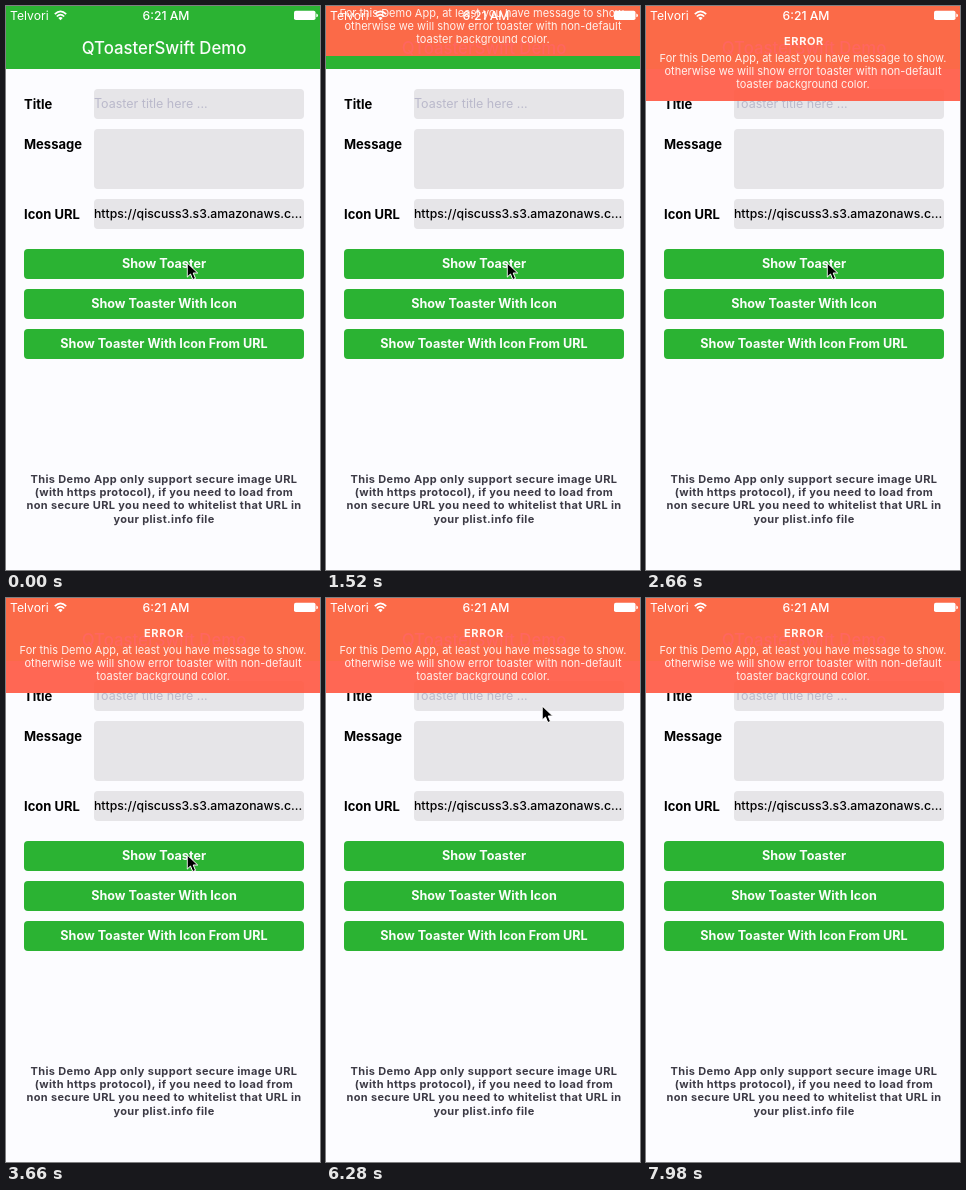
An HTML page for the animation above (8 s loop, 314 px wide and 564 px high).

```html
<!DOCTYPE html>
<html lang="en">
<head>
<meta charset="utf-8">
<title>Toaster demo</title>
<style>
  html, body { margin: 0; width: 100%; height: 100%; overflow: hidden; background: #fcfcff; }
  #stage { position: relative; width: 314px; height: 564px; overflow: hidden; background: #fcfcff;
    font: 12.5px Inter, "Open Sans", sans-serif; white-space: nowrap; }
  #stage div, #stage svg { position: absolute; }
  .header { left: 0; top: 0; width: 314px; height: 63px; background: #2bb333; }
  .heading { left: 1px; top: 29.5px; width: 314px; text-align: center;
    font-size: 16.8px; font-weight: 500; line-height: 24px; color: #fafdfa; }
  .label { left: 18px; font-size: 13px; font-weight: 700; line-height: 30px; color: #000; }
  .field { left: 88px; width: 210px; height: 30px; line-height: 30px; border-radius: 4px; background: #e6e5e8; }
  .placeholder { color: #bab9cb; }
  .url { font-size: 12.25px; font-weight: 500; color: #000; }
  .button { left: 18px; width: 280px; height: 30px; line-height: 30px; border-radius: 4px;
    background: #2bb333; color: #fafdfa; font-size: 12.6px; font-weight: 700; text-align: center; }
  .note { left: 1px; top: 467px; width: 314px; text-align: center; color: #3d3b46;
    font-size: 11px; font-weight: 700; line-height: 13.2px; letter-spacing: .35px; }
  #veil { left: 0; top: 0; width: 314px; height: 0; overflow: hidden;
    background: linear-gradient(#fb6a48 63px, #ff6754 63px); }
  #veil .heading { color: #ff6660; }
  #veil .field { top: 83px; background: #fe6550; }
  #toast { left: 0; top: 0; width: 314px; height: 95px; text-align: center; color: #fff1ec;
    font-size: 11px; line-height: 13px; transform: translateY(-95px); }
  .error { left: 1px; top: 29px; width: 314px; font-weight: 700; letter-spacing: .6px; color: #fff8f5; }
  .message { left: 0; top: 45.5px; width: 314px; }
  .status { top: 2px; font-size: 12.2px; line-height: 15px; color: #fff; }
</style>
</head>
<body>
<div id="stage">
  <div class="header"></div>
  <div class="heading">QToasterSwift Demo</div>

  <div class="label" style="top:83px">Title</div>
  <div class="label" style="top:123px">Message</div>
  <div class="label" style="top:193px">Icon URL</div>
  <div class="field placeholder" style="top:83px">Toaster title here ...</div>
  <div class="field" style="top:123px;height:60px"></div>
  <div class="field url" style="top:193px">https://qiscuss3.s3.amazonaws.c...</div>

  <div class="button" style="top:243px">Show Toaster</div>
  <div class="button" style="top:283px">Show Toaster With Icon</div>
  <div class="button" style="top:323px">Show Toaster With Icon From URL</div>

  <div class="note">This Demo App only support secure image URL<br>(with https protocol), if you need to load from<br>non secure URL you need to whitelist that URL in<br>your plist.info file</div>

  <div id="veil">
    <div class="heading">QToasterSwift Demo</div>
    <div class="field"></div>
  </div>
  <div id="toast">
    <div class="error">ERROR</div>
    <div class="message">For this Demo App, at least you have message to show.<br>otherwise we will show error toaster with non-default<br>toaster background color.</div>
  </div>

  <div class="status" style="left:4px">Telvori</div>
  <div class="status" style="left:3px;width:314px;text-align:center;font-weight:500">6:21 AM</div>
  <svg style="left:48px;top:4px" width="13" height="11" fill="none" stroke="#fff" stroke-width="1.7">
    <path d="M.8 4.2Q6.5-1.4 12.2 4.2M2.8 6.5Q6.5 2.9 10.2 6.5"/>
    <path d="M4.3 7.9Q6.5 6 8.7 7.9L6.5 10.3Z" fill="#fff" stroke="none"/>
  </svg>
  <svg style="left:287px;top:4px" width="27" height="11" fill="#fff">
    <rect x="1" y=".7" width="21.5" height="9.3" rx="1.8"/>
    <path d="M23.3 3.6Q25 4 25 5.4T23.3 7.2Z"/>
  </svg>

  <svg id="cursor" style="left:0;top:0" width="14" height="20">
    <path d="M.7.9V15.1L4 12 6.3 17.6 9 16.4 6.7 11H11.2Z" fill="#000" stroke="#fff"/>
  </svg>
</div>
<script>
const LOOP = 8000;
const TOAST_HEIGHT = 95;
const veil = document.getElementById('veil');
const toast = document.getElementById('toast');
const cursor = document.getElementById('cursor');

const clamp = v => Math.min(1, Math.max(0, v));
const progress = (v, from, to) => clamp((v - from) / (to - from));

// cubic-bezier(.42, 0, .58, 1)
function easeInOut(x) {
  if (x <= 0 || x >= 1) return x;
  let lo = 0, hi = 1, s = .5;
  for (let i = 0; i < 20; i++) {
    s = (lo + hi) / 2;
    const bx = 3 * .42 * s * (1 - s) ** 2 + 3 * .58 * s * s * (1 - s) + s ** 3;
    if (bx < x) lo = s; else hi = s;
  }
  return s * s * (3 - 2 * s);
}

// Motion advances in uneven ticks: 100, 20 and 20 ms, repeating.
function tickAt(ms) {
  const u = ms + 120, rest = u % 140;
  return 3 * Math.floor(u / 140) + (rest < 100 ? 0 : rest < 120 ? 1 : 2);
}

function draw(ms) {
  const tick = tickAt(ms);

  const shown = TOAST_HEIGHT * easeInOut(progress(tick, 28, 39.6));
  veil.style.height = shown + 'px';
  toast.style.transform = `translateY(${shown - TOAST_HEIGHT}px)`;

  const lift = progress(tick, 120, 136) ** 1.5;
  const exit = progress(tick, 136, 141);
  const x = 180.5 + 35 * lift + 25 * exit;
  const y = 256 - 149 * lift - 130 * exit;
  cursor.style.transform = `translate(${x}px, ${y}px)`;
}

const start = performance.now();
function loop() {
  draw((performance.now() - start) % LOOP);
  requestAnimationFrame(loop);
}
loop();
</script>
</body>
</html>
```
